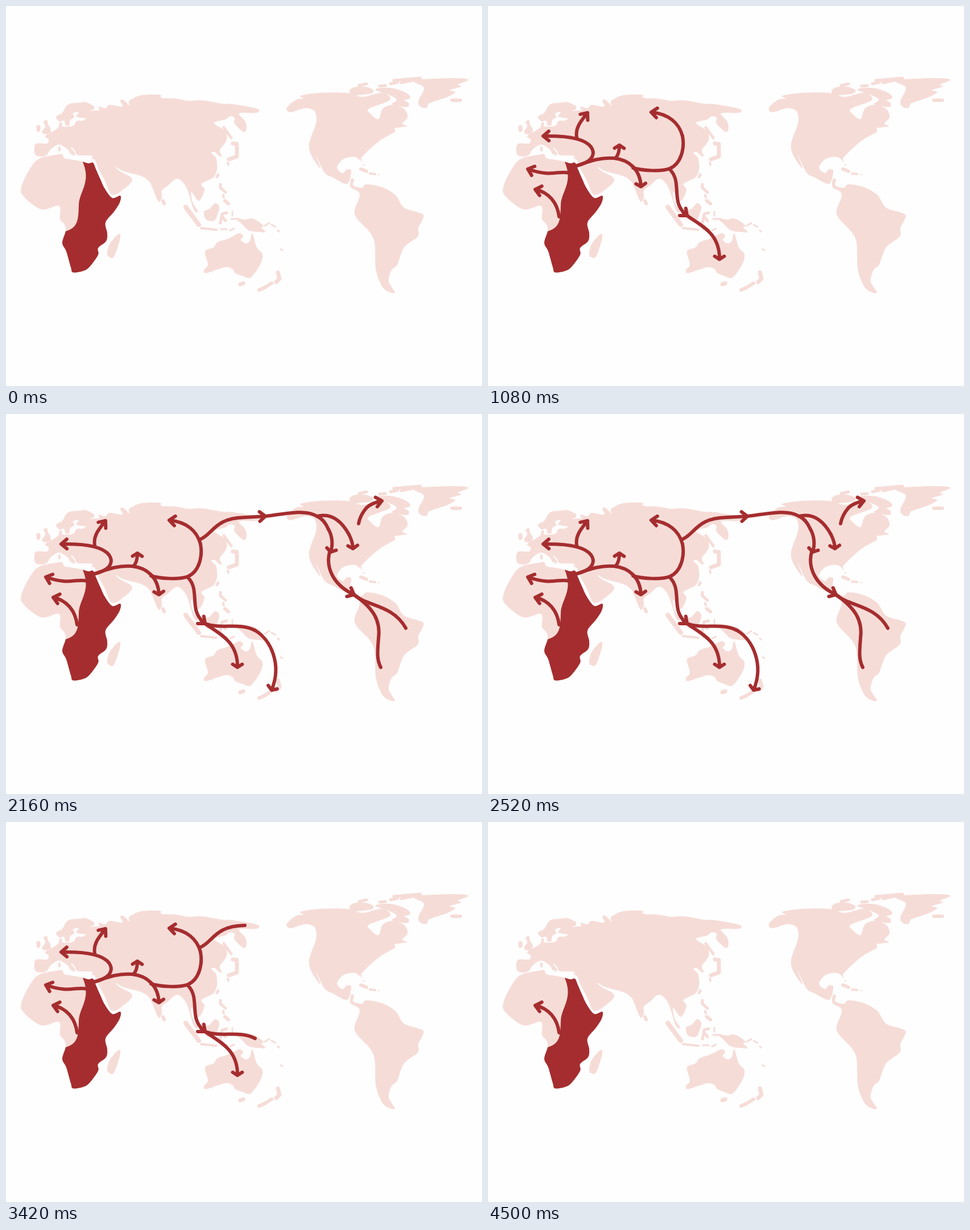
Recreate the animation shown at these times as an HTML page. Size 837 by 669 pixels, loop 4680 ms.

```html
<!DOCTYPE html>
<html lang="en">
<head>
<meta charset="utf-8">
<title>Migration map</title>
<style>
  html, body { margin: 0; width: 100%; height: 100%; overflow: hidden; background: #fefefe; }
  svg { display: block; width: 837px; height: 669px; }
  path { stroke-linecap: round; stroke-linejoin: round; }
  #land { fill: #f6dcd7; }
  #islands { fill: none; stroke: #f6dcd7; }
  #origin { fill: #a52d2f; }
  #routes { fill: none; stroke: #a52d2f; stroke-width: 6; }
</style>
</head>
<body>
<svg viewBox="0 0 837 669">
  <clipPath id="east"><path d="M133 270C152 310 129 325 128 350S128 390 104 397H90V480H220V270Z"/></clipPath>
  <g id="land"></g>
  <g id="islands"></g>
  <g id="origin" clip-path="url(#east)"></g>
  <g id="routes"></g>
</svg>
<script>
const STEP = 180, STEPS = 26;
const NARROW = { length: 13, spread: 0.7 }, WIDE = { length: 10, spread: 1 };

function addPath(parent, d) {
  const path = document.createElementNS("http://www.w3.org/2000/svg", "path");
  path.setAttribute("d", d);
  return document.getElementById(parent).appendChild(path);
}

// Closed smooth curve through "x,y" points.
function coast(text) {
  const pts = text.trim().split(/\s+/).map(p => p.split(",").map(Number));
  const at = i => pts[(i + pts.length) % pts.length];
  const handle = (i, sign) => at(i).map((v, k) => v + sign * (at(i + 1)[k] - at(i - 1)[k]) / 6);
  return addPath("land", "M" + pts[0] +
    pts.map((_, i) => `C${handle(i, 1)} ${handle(i + 1, -1)} ${at(i + 1)}`).join("") + "Z");
}

// Small island: a short round stroke.
function island(width, d) {
  addPath("islands", d).setAttribute("stroke-width", width);
}

const drawn = [];
function route(stage, d, head) {
  const path = addPath("routes", d);
  if (head) {
    const total = path.getTotalLength();
    const tip = path.getPointAtLength(total), back = path.getPointAtLength(total - 4);
    const angle = Math.atan2(back.y - tip.y, back.x - tip.x);
    const wing = sign => {
      const a = angle + sign * head.spread;
      return `${tip.x + head.length * Math.cos(a)} ${tip.y + head.length * Math.sin(a)}`;
    };
    path.setAttribute("d", `${d}M${wing(-1)}L${tip.x} ${tip.y}L${wing(1)}`);
  }
  drawn.push({ stage, path });
}

// Europe
coast(`52,243 72,242 75,235 69,229 85,219 92,214 94,206 99,206 99,212 118,211 124,203 136,202
  190,205 230,270 196,284 159,271 158,264 138,263 125,262 120,253 114,249 121,259 118,263 104,243
  117,254 113,261 109,253 93,244 78,253 72,262 62,265 51,261`);
coast(`88,195 99,188 104,179 112,172 130,170 139,169 154,176 154,182 147,185 163,184 175,190
  170,208 145,208 143,199 124,195 128,187 118,189 120,196 113,201 111,210 105,210 102,202 94,203`);
coast("63,222 70,226 78,222 78,215 74,209 72,201 66,204 69,212");
island(7, "M57 213L57 218");
island(4, "M94 249V254");
island(3, "M152 268H154");

// Northern Asia
coast(`145,196 163,185 163,177 175,180 182,174 204,177 201,167 206,165 217,175 216,168 223,163
  238,157 270,156 274,162 299,163 321,167 345,166 380,172 400,173 442,181 440,188 410,189 420,202
  423,214 418,222 402,207 402,197 394,194 385,200 366,206 385,220 388,236 376,254 380,264 375,264
  361,259 330,300 220,285 150,245 128,212`);

// Southern Asia
coast(`155,240 300,225 362,260 371,278 370,292 363,303 344,313 349,324 339,343 326,327 328,345
  338,362 330,358 317,319 301,304 285,316 274,325 274,337 268,344 257,319 252,309 237,299 207,291
  192,282 199,290 222,305 205,324 186,332 173,306 159,277`);
island(6, "M276 343L278 348");
island(5, "M383 214L396 232");
island(7, "M399 242L406 243");
island(7, "M406 248L406 265L392 270");
island(4, "M390 276L391 279");
island(5, "M373 297L371 301");

// South-east islands
island(5, "M377 314L377 320L386 328");
island(4, "M382 333L383 337");
island(6, "M385 343L391 348");
island(8, "M316 354L328 370L339 385");
coast("348,362 358,357 368,347 375,354 372,367 366,378 352,376");
island(4, "M343 391L370 394");
island(3, "M378 393H388M394 395L401 392");
island(5, "M388 364L380 366L377 382M380 371L386 378");
island(3, "M398 362V369M396 375H403");
coast("403,373 420,376 432,374 445,380 453,388 449,390 456,398 436,397 425,394 415,384");
island(3, "M455 387L463 382M467 385L474 389M478 395L480 397M483 428L486 430");

// Africa
const africa = coast(`60,268 88,262 99,261 103,268 120,271 134,274 145,277 153,276 158,287 165,303
  174,322 187,338 201,334 200,346 190,362 175,381 178,400 176,414 162,426 162,438 148,458 137,466
  118,469 114,460 106,432 99,417 105,396 103,385 95,375 93,352 62,358 30,334 28,315 45,282`);
document.getElementById("origin").append(africa.cloneNode());
coast("197,402 201,408 190,441 180,441 178,433 183,418");

// Australia and New Zealand
coast(`350,432 365,425 372,416 392,409 410,400 417,405 413,412 422,418 429,413 433,400 441,425
  451,437 447,455 430,478 415,475 403,470 398,463 385,460 353,470 348,465 355,455`);
island(7, "M412 490L417 488");
island(7, "M478 469L481 480L475 486");
island(6, "M467 488L456 495L445 500");

// North America
coast(`494,179 510,165 523,163 518,158 550,153 600,153 627,160 658,153 673,158 673,167 638,181
  641,190 655,199 663,180 682,174 701,182 706,196 697,207 705,212 684,215 683,222 656,238 626,266
  627,275 615,266 600,267 590,272 582,285 592,294 599,288 607,290 600,313 575,302 560,293 545,263
  553,286 538,265 533,243 545,207 545,191 540,183 525,180 500,187`);
island(6, "M624 287L634 291");
island(4, "M640 295L649 296");
island(2, "M655 297H656M628 280H630");

// Arctic islands and Greenland
coast("604,150 612,143 630,142 645,147 642,154 612,157");
island(5, "M621 140L634 137");
island(5, "M657 141L667 140");
coast(`650,148 662,144 682,145 704,153 711,162 701,166 708,171 705,178 679,173 687,166 679,159`);
island(5, "M676 137L689 134");
island(5, "M682 131L729 127M695 135L728 128");
coast(`718,134 732,129 790,127 813,130 795,138 800,142 781,148 790,152 774,161 745,171 740,179
  730,178 725,168 735,144`);
island(6, "M784 166L799 166");

// South America
coast(`607,304 612,306 611,316 626,320 634,314 661,319 685,333 700,355 732,366 732,377 725,391
  724,406 700,425 688,455 678,465 673,485 684,505 667,500 657,485 650,461 646,409 618,375 613,360
  622,331 606,319`);

// Routes, by the stage at which each part appears
route(1, "M125 371C122 346 107 328 83 323", NARROW);
route(2, "M143 294C122 289 112 302 70 287", NARROW);
route(3, "M156 281C190 273 187 256 181 248");
route(3, "M155 282C180 272 200 266 222 268");
route(4, "M181 248C170 233 140 228 97 229", NARROW);
route(4, "M156 231C153 214 164 202 175 188", NARROW);
route(4, "M222 268C250 271 268 290 269 318", WIDE);
route(4, "M224 268C230 262 231 254 231 245", WIDE);
route(5, "M255 285C272 290 305 292 320 286C340 277 346 250 342 229");
route(5, "M320 288C342 310 321 345 347 366");
route(6, "M342 229C336 206 318 190 287 187", NARROW);
route(6, "M343 363L350 369", NARROW);
route(6, "M350 369C375 387 408 400 407 446", WIDE);
route(7, "M341 221C365 211 366 183 420 182");
route(7, "M350 369C380 380 410 366 438 381");
route(8, "M420 182L456 180", NARROW);
route(8, "M438 381C465 397 486 440 467 486", WIDE);
route(9, "M456 180C490 176 525 167 547 180C558 185 563 194 567 203");
route(9, "M547 180C575 173 592 192 603 212");
route(10, "M567 203C574 215 575 230 571 243", WIDE);
route(10, "M603 212C608 222 610 230 610 237", WIDE);
route(11, "M569 243C562 270 575 301 612 318", NARROW);
route(11, "M620 193C622 182 627 173 634 165");
route(12, "M634 165C641 158 650 155 661 153", NARROW);
route(12, "M612 318C634 339 680 335 703 377");
route(12, "M612 318C647 343 659 364 655 395C653 420 652 433 659 446");
route(13, "M700 372L703 378", NARROW);
route(13, "M657 442L659 448", NARROW);

// The stages build up to the middle of the loop, then run backwards.
const start = performance.now();
function render(now) {
  const step = Math.floor(Math.max(0, now - start) / STEP) % STEPS;
  const current = Math.min(step, STEPS - step);
  drawn.forEach(r => r.path.style.display = r.stage <= current ? "" : "none");
  requestAnimationFrame(render);
}
render(start);
</script>
</body>
</html>
```
